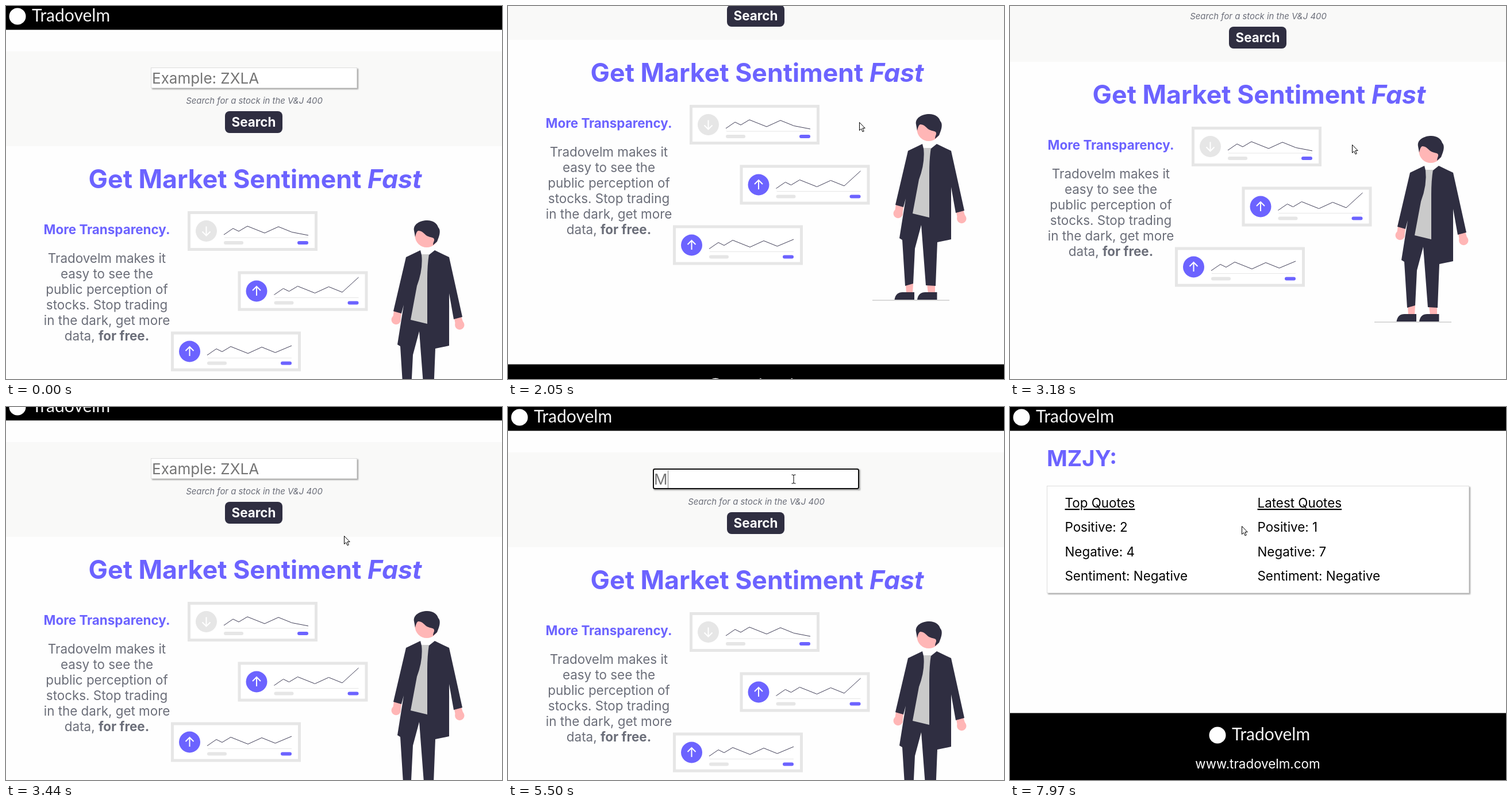
These frames come from a looping animation (863x649 px, 8000 ms). An HTML page:

```html
<!DOCTYPE html>
<html lang="en">
<head>
<meta charset="utf-8">
<title>Market sentiment demo</title>
<style>
  html, body { margin: 0; width: 100%; height: 100%; overflow: hidden; background: #fefefe; }
  svg { display: block; width: 100vw; height: 100vh; }
  text { font-family: Inter, sans-serif; font-size: 22.4px; font-weight: 400; font-optical-sizing: none; }
  .mid { text-anchor: middle; }
  .bold { font-weight: 700; }
  .accent { fill: #6c63ff; }
  .dark { fill: #2f2e41; }
  .skin { fill: #ffb6b6; }
  .grey { fill: #6b6e79; }
  .white { fill: #fff; }
  .word { font-family: Lato, sans-serif; font-size: 30px; fill: #f4f4f4; }
  .field { font-size: 26px; fill: #757575; }
  .panel { fill: #fff; stroke: #dcdcdc; filter: drop-shadow(2px 2px 1px #0005); }
  .pointer path { fill: #fff; stroke: #000; stroke-linejoin: round; }
</style>
</head>
<body>
<svg id="stage" viewBox="0 0 863 649" xmlns="http://www.w3.org/2000/svg"></svg>
<script>
const LOOP = 8000, TICK = 66.4, START = 460;
const BRAND = 'Tradovelm', TICKER = 'MZJY';

const text = (x, y, content, cls = '', style = '') =>
  `<text x="${x}" y="${y}" class="${cls}" style="${style}">${content}</text>`;
const rect = (x, y, w, h, fill, r = 0) =>
  `<rect x="${x}" y="${y}" width="${w}" height="${h}" rx="${r}" fill="${fill}"/>`;

const brand = (cx, cy) =>
  `<circle cx="${cx}" cy="${cy}" r="14.5" fill="#fff"/>` + text(cx + 25, cy + 9, BRAND, 'word');

const header = rect(0, 0, 863, 41.4, '#000') + brand(20, 18);

const footer = y => `<g transform="translate(0 ${y})">
  ${rect(0, -.5, 863, 166, '#000')}
  ${brand(361, 38)}
  ${text(431, 96, `www.${BRAND.toLowerCase()}.com`, 'mid white')}
  ${text(431.5, 134, 'Copyright 2021 @ Virlon Telmorsevich', 'mid white', 'font-size:15.7px')}
</g>`;

// Stock card; only the end of the chart and the arrow differ.
const card = (x, y, endY, up) => `<g transform="translate(${x} ${y})">
  <rect x="2.5" y="2.5" width="221" height="64" fill="#fff" stroke="#e6e6e6" stroke-width="5"/>
  <circle cx="32.5" cy="34.5" r="18.5" fill="${up ? '#6c63ff' : '#e6e6e6'}"/>
  <path d="M0-7.5V8M-7-1L0-8L7-1" transform="translate(32.5 34.5) rotate(${up ? 0 : 180})"
    fill="none" stroke="#fff" stroke-width="2"/>
  <path d="M64 46H210" stroke="#e6e6e6"/>
  <polyline points="63,41 79,30 89,35 104,26 134,38 158,27 181.5,36.5 210,${endY}"
    fill="none" stroke="#3f3d56"/>
  ${rect(63, 52, 34, 6, '#e6e6e6', 3)}
  ${rect(191, 52, 19, 6, '#6c63ff', 3)}
</g>`;

const shoe = x => `<path class="dark" d="M${x} 696Q${x + 2} 683 ${x + 14} 683H${x + 34.5}V696Z"/>`;

const person = `
  <path d="M634 697H768" stroke="#ccc" stroke-width="1.4"/>
  <path class="skin" d="M692 668H705L704 685H693ZM729 669H743V685H731Z"/>
  ${shoe(672.5)}${shoe(712)}
  <path class="skin" d="M675 530L688 534L686 550H672ZM780 543L792 540L797 555H782Z"/>
  <circle class="skin" cx="678.7" cy="546" r="8.2"/>
  <circle class="skin" cx="789.3" cy="555" r="8.2"/>
  <path class="dark" d="M721 425L696 437L674 531L688 535L692 520L681 589L686 592L691 672L705 668
    L708 607L719 566L727 671L744 672L747 596L771 591V500L779 545L794 541L771 437L746 425L736 433H723Z"/>
  <path fill="#cacaca" d="M723 432H736Q733 450 733 475V553L704 546L715 487Q726 458 723 432Z"/>
  <circle class="skin" cx="732" cy="399.5" r="20.5"/>
  <path class="dark" d="M710 391C708 380 720 373 733 373C743 373 750 378 752 385C756 389 755 396 753 402
    L750 410L743 416C743 410 747 408 744 404C740 402 735 402 731 399C726 395 724 391 717 391
    C714 393 713 397 712 402Z"/>`;

const story = [`${BRAND} makes it`, 'easy to see the', 'public perception of', 'stocks. Stop trading',
  'in the dark, get more', 'data, <tspan class="bold">for free.</tspan>'];

const home = `<g id="home">
  ${header}
  ${rect(0, 79, 863, 165, '#f9f9f8')}
  <rect id="input" class="panel" x="252.5" y="107.5" width="358" height="35"/>
  <rect id="ring" x="253" y="108" width="357" height="34" rx="2.5" fill="none" stroke="#101010" stroke-width="2"/>
  <text id="typed" class="field" x="254" y="134.5"></text>
  <rect id="caret" y="110" width="1" height="31" fill="#777"/>
  ${text(432, 170, 'Search for a stock in the V&amp;J 400', 'mid grey', 'font-size:14.9px;font-style:italic')}
  ${rect(381, 183, 100, 38, '#2f2e41', 8)}
  ${text(431, 210, 'Search', 'mid bold white')}
  ${text(433.5, 317, 'Get Market Sentiment <tspan font-style="italic">Fast</tspan>', 'mid bold accent', 'font-size:44.6px')}
  ${text(175.5, 397, 'More Transparency.', 'mid bold accent')}
  ${story.map((line, i) => text(175.5, 447 + 27 * i, line, 'mid grey')).join('')}
  ${card(316, 357, 42, false)}
  ${card(403.5, 461.5, 10.5, true)}
  ${card(287, 566.5, 24.5, true)}
  ${person}
  ${footer(809)}
</g>`;

const column = (x, rows) => rows.map((row, i) =>
  text(x, 175 + 42.3 * i, row, '', i ? '' : 'text-decoration:underline')).join('');

const results = `<g id="results">
  ${header}
  ${text(64, 103, `${TICKER}:`, 'bold accent', 'font-size:38.4px')}
  <rect class="panel" x="64.5" y="137.5" width="734" height="186"/>
  ${column(95.5, ['Top Quotes', 'Positive: 2', 'Negative: 4', 'Sentiment: Negative'])}
  ${column(430.5, ['Latest Quotes', 'Positive: 1', 'Negative: 7', 'Sentiment: Negative'])}
  ${footer(533)}
</g>`;

const pointers = `<g id="pointer" class="pointer">
  <path id="arrow" d="M.5.5V14.5L3.7 11.6L6 16.8L8.2 15.9L6 10.6H10.2Z"/>
  <path id="beam" d="M-3.5-7H-1L0-6L1-7H3.5M0-6V7M-3.5 8H-1L0 7L1 8H3.5" style="fill:none"/>
  <path id="hand" d="M-1.5 14V1.5Q0-1 1.5 1.5V8Q3.5 6 4.5 8.5Q6.5 7 7.5 9.5Q10 8.5 10.5 11V16L8.5 21.5H0
    L-5.5 13Q-5.5 10.5-3.5 11.5Z"/>
</g>`;

document.getElementById('stage').innerHTML = home + results + pointers;
const el = Object.fromEntries([...document.querySelectorAll('[id]')].map(node => [node.id, node]));

const scrollKeys = [[1788, 0], [2054, 185], [2200, 270], [2380, 325], [2850, 325], [3182, 147], [3330, 60], [3500, 0]];
const pointerKeys = [
  [460, 829, 638], [660, 745, 430], [860, 640, 245], [990, 577, 190], [1185, 611, 202],
  [2100, 611, 202], [2640, 595, 241], [3190, 595, 241], [3700, 582, 207], [3720, 582, 207],
  [4110, 515, 111], [4300, 497, 125], [6640, 497, 125], [7030, 432, 211], [7170, 432, 211],
  [7360, 438, 219], [7770, 438, 219], [7960, 403, 207]];
const typing = [[0, 'Example: ZXLA'], [5500, 1], [5700, 2], [5970, 3], [6430, 4]];
const caretSpans = [[4640, 5170], [5500, 6960]];

function along(keys, t) {
  const next = keys.findIndex(key => key[0] > t);
  if (next === 0) return keys[0].slice(1);
  if (next < 0) return keys.at(-1).slice(1);
  const a = keys[next - 1], b = keys[next], p = (t - a[0]) / (b[0] - a[0]);
  return a.slice(1).map((v, i) => Math.round(v + (b[i + 1] - v) * p));
}

const show = (node, on) => { node.style.display = on ? '' : 'none'; };

function pointerKind(t, y) {
  if (t >= 6960 && t < 7830) return 'hand';
  return t > 3780 && t < 7000 && y > 107 && y < 143 ? 'beam' : 'arrow';
}

function draw(t) {
  const stepped = START + TICK * Math.floor((t - START + 8) / TICK);
  const [scroll] = along(scrollKeys, stepped);
  const [x, y] = along(pointerKeys, stepped);

  show(el.home, t < 7500);
  show(el.results, t >= 7500);
  el.home.setAttribute('transform', `translate(0 ${-scroll})`);

  const entry = typing.findLast(key => key[0] <= t)[1];
  const value = typeof entry === 'number' ? TICKER.slice(0, entry) : entry;
  if (el.typed.textContent !== value) el.typed.textContent = value;
  const caretOn = caretSpans.some(([from, to]) => t >= from && t < to);
  show(el.caret, caretOn);
  if (caretOn) el.caret.setAttribute('x', t < 5500 ? 255 : Math.round(254 + el.typed.getComputedTextLength()));
  show(el.ring, t >= 4570 && t < 7230);

  show(el.pointer, t >= START);
  el.pointer.setAttribute('transform', `translate(${x} ${y})`);
  const kind = pointerKind(t, y);
  for (const name of ['arrow', 'beam', 'hand']) show(el[name], name === kind);
}

const begin = performance.now();
function frame() {
  draw((performance.now() - begin) % LOOP);
  requestAnimationFrame(frame);
}
frame();
</script>
</body>
</html>
```
